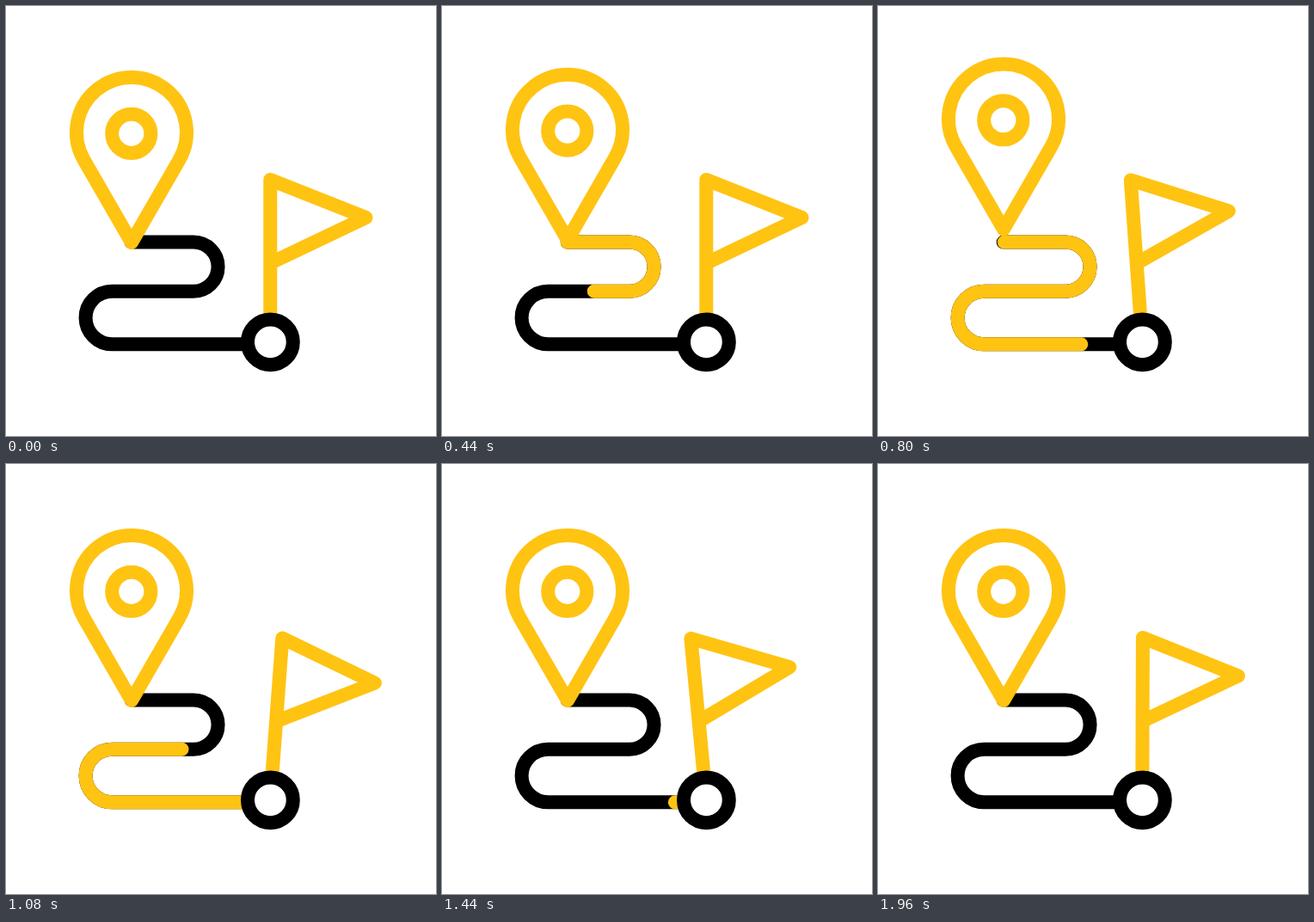
Write an HTML page that moves like this. It is 500 px wide and 500 px high and loops after 2000 ms.

```html
<!DOCTYPE html>
<html lang="en">
<head>
<meta charset="utf-8">
<title>Route</title>
<style>
  html, body { margin: 0; width: 100%; height: 100%; overflow: hidden; background: #fff; }
  svg { display: block; width: 100%; height: 100%; }
  g, path, circle { fill: none; stroke-width: 16; stroke-linecap: round; stroke-linejoin: round; }
  .dark { stroke: #000; }
  .gold { stroke: #ffc312; }
  #ring { fill: #fff; }
</style>
</head>
<body>
<svg viewBox="0 0 500 500">
  <path id="road" class="dark" d="M145.7 274.6H218a28.55 28.55 0 0 1 0 57.1H123.4a30.8 30.8 0 0 0 0 61.6H307"/>
  <path id="trail" class="gold"/>
  <g id="flag" class="gold">
    <path d="M307.3 391V202L418.5 246L307.3 299"/>
  </g>
  <circle id="ring" class="dark" cx="307.4" cy="390.8" r="26.4"/>
  <g id="pin" class="gold">
    <path d="M146 275L90.6 179A64 64 0 1 1 201.4 179Z"/>
    <circle cx="145.8" cy="148.3" r="22.6"/>
  </g>
</svg>
<script>
const LOOP = 2000, STEP = 40;
const [road, trail, flag, pin] = ['road', 'trail', 'flag', 'pin'].map(id => document.getElementById(id));
trail.setAttribute('d', road.getAttribute('d'));
const length = road.getTotalLength();

// Keys are [time, value] pairs.
const hop = [[0, 0], [245, -50], [475, 0], [685, -25], [960, 0]];
const sway = [[730, 0], [910, -12.2], [1185, 12.2], [1470, -6], [1730, 3], [2000, 0]];
const headKeys = [[80, 0], [1200, 1]];
const tailKeys = [[780, 0], [1565, 1]];

// Ease in and out; a larger skew gives a longer slow end.
function ease(u, skew) {
  let lo = 0, hi = 1;
  for (let i = 0; i < 24; i++) {
    const s = (lo + hi) / 2;
    if (s - skew * (1 - s) * s * s < u) lo = s; else hi = s;
  }
  return lo * lo * (3 - 2 * lo);
}

function at(keys, t, skew = 0) {
  if (t <= keys[0][0]) return keys[0][1];
  const i = keys.findIndex(key => key[0] > t);
  if (i < 0) return keys[keys.length - 1][1];
  const [t0, a] = keys[i - 1], [t1, b] = keys[i];
  return a + (b - a) * ease((t - t0) / (t1 - t0), skew);
}

function draw(now) {
  const t = Math.floor(now % LOOP / STEP) * STEP;
  pin.setAttribute('transform', `translate(0 ${at(hop, t)})`);
  flag.setAttribute('transform', `rotate(${at(sway, t)} 307.3 391)`);

  const head = at(headKeys, t, 0.95) * length;
  const tail = at(tailKeys, t) * length;
  trail.style.display = head - tail > 0.1 ? '' : 'none';
  trail.setAttribute('stroke-dasharray', `${Math.max(head - tail, 0.1)} ${length * 3}`);
  trail.setAttribute('stroke-dashoffset', -tail);
}

function tick() {
  draw(performance.now());
  requestAnimationFrame(tick);
}
tick();
</script>
</body>
</html>
```
